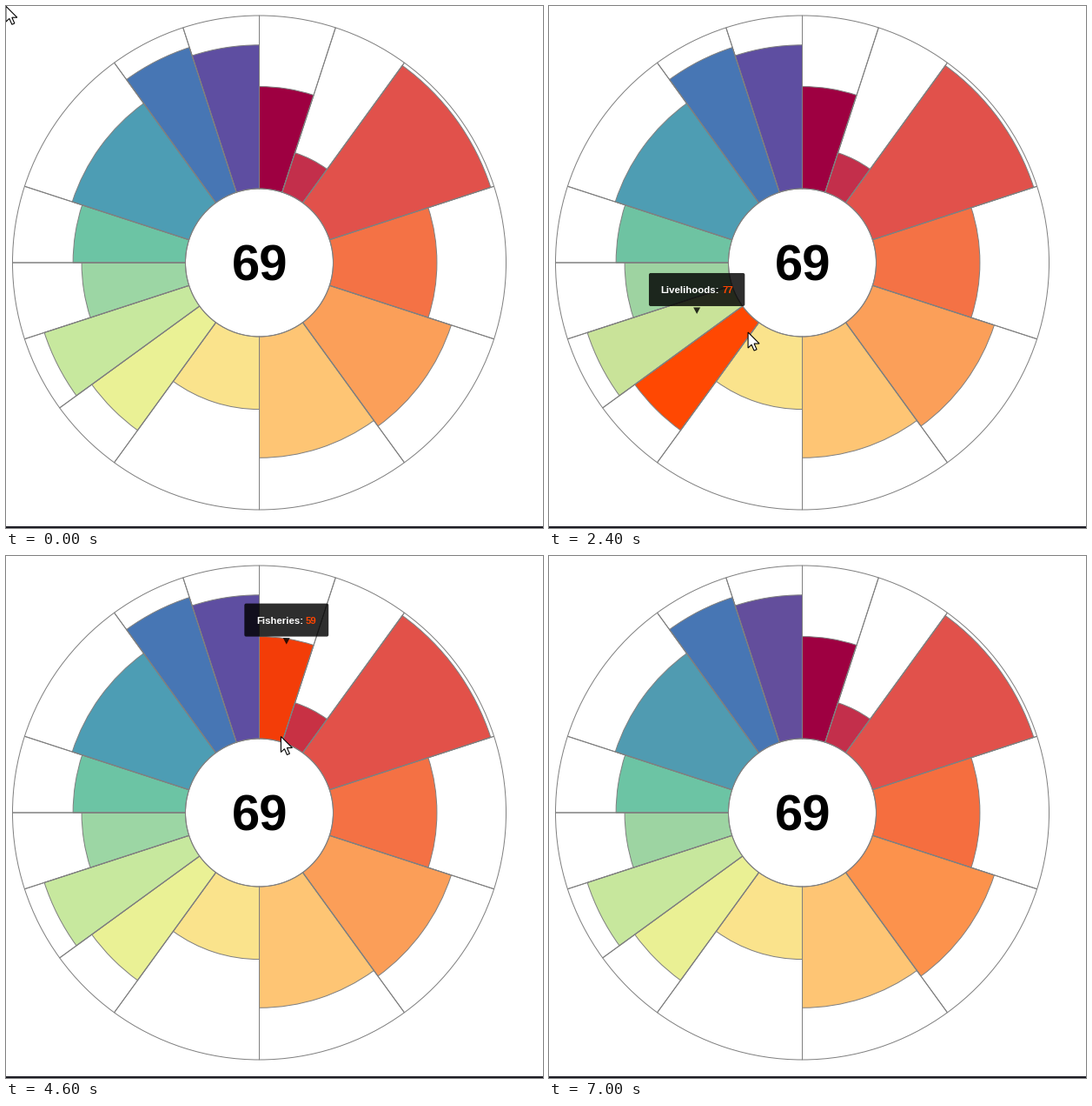
Write a matplotlib script that moves like this. It is 618 px wide and 600 px high and loops after 7.1 s.

```python
import numpy as np
import matplotlib.pyplot as plt
from matplotlib.animation import FuncAnimation
from matplotlib.patches import FancyBboxPatch, Polygon, Rectangle, Wedge
from matplotlib.colors import to_rgb

W, H, DPI = 618, 600, 100
FRAMES, STEP = 71, 100
PX = 72 / DPI
CX, CY = 291.5, 295
INNER, OUTER = 85, 284
GRAY, HOT = "#808080", "#ff4500"
FONT = "Liberation Sans"

# label, score, weight, colour; clockwise from the top
GOALS = [
    ("Fisheries", 59, 0.5, "#9e0041"),
    ("Mariculture", 24, 0.5, "#c32f4b"),
    ("Artisanal Fishing Opportunities", 98, 1, "#e1514b"),
    ("Natural Products", 60, 1, "#f47245"),
    ("Carbon Storage", 74, 1, "#fb9f59"),
    ("Coastal Protection", 70, 1, "#fec574"),
    ("Tourism & Recreation", 42, 1, "#fae38c"),
    ("Livelihoods", 77, 0.5, "#eaf195"),
    ("Economies", 88, 0.5, "#c7e89e"),
    ("Iconic Species", 60, 0.5, "#9cd6a4"),
    ("Lasting Special Places", 65, 0.5, "#6cc4a4"),
    ("Clean Waters", 71, 1, "#4d9db4"),
    ("Habitats", 88, 0.5, "#4776b4"),
    ("Species", 83, 0.5, "#5e4ea1"),
]
ENDS = np.cumsum([g[2] for g in GOALS]) * 36
STARTS = np.concatenate([[0], ENDS[:-1]])
RADII = [INNER + (OUTER - INNER) * g[1] / 100 for g in GOALS]


def steady(s):
    return s


def smooth(s):
    return s ** 3 * (10 - 15 * s + 6 * s * s)


def speed_up(s):
    return s ** 1.5


# pointer stops: frame, degrees and radius about the centre, easing onward
STOPS = [
    (0, -44.4, 414, steady),
    (5, -28, 240, smooth),
    (10, -35.6, 128, smooth),
    (24, -142.6, 99.5, smooth),
    (35, -232.7, 155, smooth),
    (45, -346.4, 91.6, speed_up),
    (63, -92.5, 160.7, steady),
    (68, 117.5, 170, steady),
    (70, 117.5, 450, steady),
]


def polar(angle, radius):
    a = np.radians(angle)
    return CX + radius * np.sin(a), CY - radius * np.cos(a)


def pointer(frame):
    """Angle and radius of the pointer."""
    for (f0, a0, r0, ease), (f1, a1, r1, _) in zip(STOPS, STOPS[1:]):
        if frame <= f1:
            break
    t = ease((frame - f0) / (f1 - f0))
    return a0 + (a1 - a0) * t, r0 + (r1 - r0) * t


def hovered(frame):
    angle, radius = pointer(frame)
    k = int(np.searchsorted(ENDS, angle % 360, side="right"))
    return k if INNER < radius < RADII[k] else None


HOVERS = [hovered(f) for f in range(FRAMES)]


def tint(frame, k):
    """Share of the hover colour in slice k, by time since it changed."""
    on = HOVERS[frame] == k
    run = 0
    while run < frame and (HOVERS[frame - run - 1] == k) == on:
        run += 1
    if on:
        return 1 - 0.9 * np.exp(-run)
    return 0 if run == frame else 0.25 * 0.6 ** run


def tip_anchor(k):
    """Top centre of the slice's bounding box."""
    angles = np.linspace(STARTS[k], ENDS[k], 30)
    xs, ys = np.hstack([polar(angles, INNER), polar(angles, RADII[k])])
    return (xs.min() + xs.max()) / 2, ys.min()


fig = plt.figure(figsize=(W / DPI, H / DPI), dpi=DPI, facecolor="white")
ax = fig.add_axes([0, 0, 1, 1])
ax.set_xlim(0, W)
ax.set_ylim(H, 0)
ax.axis("off")


def wedge(k, radius, **style):
    return ax.add_patch(Wedge((CX, CY), radius, STARTS[k] - 90, ENDS[k] - 90,
                              width=radius - INNER, edgecolor=GRAY,
                              linewidth=PX, **style))


def label(x, y, text, size, color, **style):
    return ax.text(x, y, text, fontsize=size * PX, color=color, family=FONT,
                   weight="bold", **style)


slices = [wedge(k, RADII[k], facecolor=g[3], zorder=1)
          for k, g in enumerate(GOALS)]
for k in range(len(GOALS)):
    wedge(k, OUTER, facecolor="none", zorder=2)
label(CX + 0.4, CY + 20, "69", 58, "black", ha="center", va="baseline")
ax.add_patch(Rectangle((0, 598), W, 2, color="#1c1c24", linewidth=0))

SHADE = (0, 0, 0, 0.82)
PAD, TIP_H, TIP_FONT = 13.5, 38, 11.35
box = ax.add_patch(FancyBboxPatch((0, 0), 10, TIP_H, facecolor=SHADE,
                                  boxstyle="round,pad=0,rounding_size=2",
                                  linewidth=0, zorder=5))
arrow = ax.add_patch(Polygon([(0, 0)] * 3, facecolor=SHADE, linewidth=0,
                             zorder=5))
name = label(0, 0, "", TIP_FONT, "white", ha="left", zorder=6)
value = label(0, 0, "", TIP_FONT, HOT, ha="right", zorder=6)
TIP_PARTS = (box, arrow, name, value)


def text_width(text):
    name.set_text(text)
    return name.get_window_extent(fig.canvas.get_renderer()).width


WIDTHS = [text_width(f"{g[0]}: {g[1]}") for g in GOALS]

CURSOR = np.array([(0, 0), (0, 18), (4, 14.2), (7, 21), (10, 19.7),
                   (7, 13), (13, 13)])
HOT_SPOT = (2, -1)
cursor = ax.add_patch(Polygon(CURSOR, facecolor="white", edgecolor="black",
                              linewidth=1.1 * PX, zorder=8))


def show_tip(k):
    for part in TIP_PARTS:
        part.set_visible(k is not None)
    if k is None:
        return
    x, y = tip_anchor(k)
    half = WIDTHS[k] / 2
    box.set_bounds(x - half - PAD, y - TIP_H, 2 * (half + PAD), TIP_H)
    arrow.set_xy([(x - 4, y + 1.5), (x + 4, y + 1.5), (x, y + 9)])
    base = y - TIP_H / 2 + 4
    name.set_text(GOALS[k][0] + ":")
    name.set_position((x - half, base))
    value.set_text(str(GOALS[k][1]))
    value.set_position((x + half, base))


def update(frame):
    hot = np.array(to_rgb(HOT))
    for k, piece in enumerate(slices):
        base = np.array(to_rgb(GOALS[k][3]))
        piece.set_facecolor(base + (hot - base) * tint(frame, k))
    show_tip(HOVERS[frame])
    cursor.set_xy(CURSOR + np.array(polar(*pointer(frame))) - HOT_SPOT)
    return [*slices, *TIP_PARTS, cursor]


anim = FuncAnimation(fig, update, frames=FRAMES, interval=STEP, repeat=True,
                     repeat_delay=0, cache_frame_data=False)
plt.show()
```
